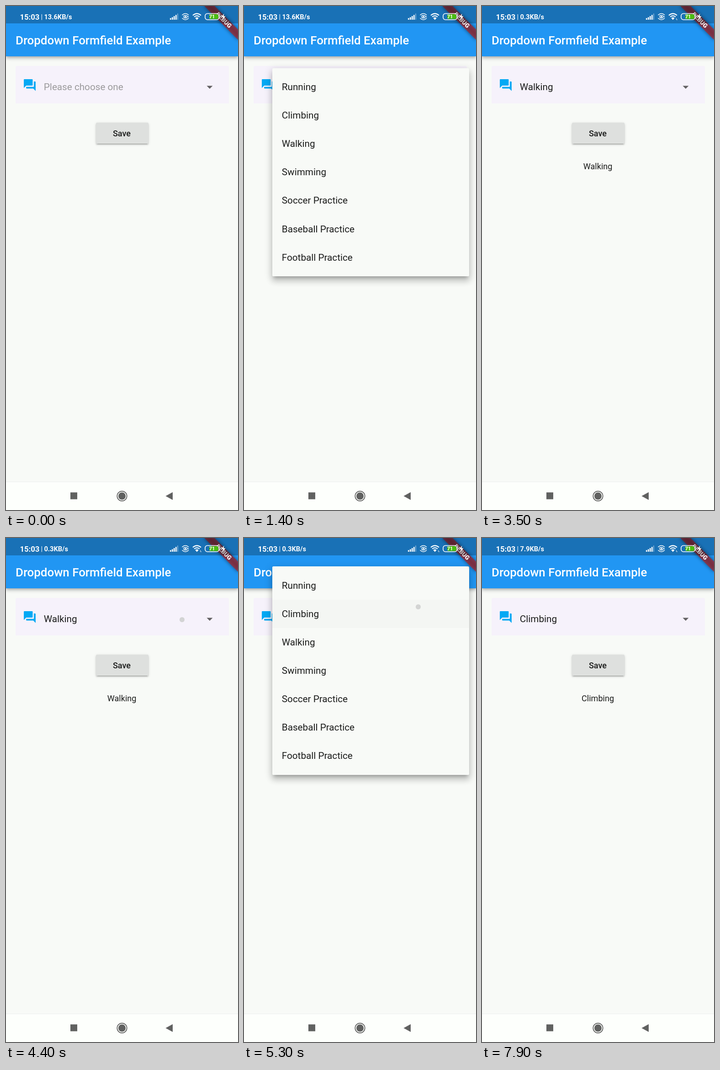
Animation of 508x1102 px, one loop 8 s. Source, as an HTML page:

```html
<!DOCTYPE html>
<html lang="en">
<head>
<meta charset="utf-8">
<title>Dropdown form field</title>
<style>
  html, body { margin: 0; width: 100%; height: 100%; overflow: hidden; }
  body { position: relative; background: #f8faf7; font-family: Roboto, sans-serif; }
  div, svg { position: absolute; }
  svg { left: 0; top: 0; }
  .bar {
    left: 0; top: 0; width: 508px; height: 110px; background: #2196f3;
    box-shadow: 0 2.6px 5.2px -1.3px #0003, 0 5.2px 6.5px #00000024, 0 1.3px 13px #0000001f;
  }
  .field { left: 21px; top: 131px; width: 467px; height: 82px; background: #f6f2fb; border-radius: 3px 3px 0 0; }
  .save {
    left: 197px; top: 254.5px; width: 114.5px; height: 46.5px; border-radius: 2.6px; background: #dee0de;
    box-shadow: 0 3.9px 1.3px -2.6px #0003, 0 2.6px 2.6px #00000024, 0 1.3px 6.5px #0000001f;
  }
  .press { inset: 0; border-radius: inherit; background: #d6d4d3; }
  .menu {
    left: 62px; width: 430.5px; overflow: hidden; border-radius: 2.6px; background: #f8faf7;
    box-shadow: 0 6.5px 6.5px -3.9px #0003, 0 10.4px 13px 1.3px #00000024, 0 3.9px 18px 2.6px #0000001f;
  }
  .row { left: 0; width: 430.5px; height: 62.1px; line-height: 62.1px; text-indent: 20.8px; font-size: 20.7px; color: #1b1c1b; }
  .corner { right: 0; top: 0; width: 120px; height: 120px; overflow: hidden; }
  .ribbon {
    left: 68.25px; top: 36.2px; width: 103.5px; height: 15.5px; transform-origin: 51.75px -36.2px; transform: rotate(45deg);
  }
  .ribbon div { inset: 0; }
  .shade { background: #0000007f; filter: blur(4.5px); }
  .debug { background: #b71c1ca0; color: #fff; font: 900 13.2px/15.5px Roboto, sans-serif; text-align: center; }
  .scrim { left: 0; top: 0; width: 508px; height: 38px; background: #00000040; }
  .nav { left: 0; top: 1041px; width: 508px; height: 61px; background: #fdfffc; box-shadow: 0 -1px #eef0ee; }
  .dot { width: 11px; height: 11px; margin: -5.5px; border-radius: 50%; background: #cacccacc; }
</style>
</head>
<body>
<div class="bar"></div>
<div class="field"></div>
<div class="save"><div class="press" id="press"></div></div>

<svg width="508" height="1102" fill="#1b1c1b">
  <text x="21" y="83.5" font-size="25.87" font-weight="500" fill="#fff">Dropdown Formfield Example</text>
  <path transform="translate(36.4 157.3) scale(1.2936)" fill="#03a9f4"
    d="M21 6h-2v9H6v2c0 .55.45 1 1 1h11l4 4V7c0-.55-.45-1-1-1zm-4 6V3c0-.55-.45-1-1-1H3c-.55 0-1 .45-1 1v14l4-4h10c.55 0 1-.45 1-1z"/>
  <path fill="#626062" d="M439.5 174.5h13l-6.5 6.5z"/>
  <text id="value" x="82.8" y="184.2" font-size="20.7"></text>
  <text x="253.5" y="284.5" font-size="18.1" font-weight="500" text-anchor="middle">Save</text>
  <text id="result" x="253.6" y="357" font-size="18.1" text-anchor="middle"></text>
</svg>

<div class="menu" id="menu"></div>
<div class="corner"><div class="ribbon"><div class="shade"></div><div class="debug">DEBUG</div></div></div>
<div class="scrim"></div>
<div class="nav"></div>

<svg width="508" height="1102" fill="#fff">
  <g font-weight="700">
    <text x="30.5" y="29.5" font-size="16.6">15:03</text>
    <text x="76.5" y="29" font-size="14.6" font-weight="400">|</text>
    <text id="speed" x="83.5" y="29" font-size="14.6"></text>
  </g>
  <path d="M359 26.5h2.6v3.5h-2.6zM363 24.5h2.6v5.5h-2.6zM367 22h2.6v8h-2.6zM371 19.5h2.6v10.5h-2.6z"/>
  <path opacity=".4" d="M375 16.5h2v13.5h-2z"/>
  <g fill="none" stroke="#fff" stroke-width="1.6" stroke-linecap="round">
    <path d="M386 19.5q6.8-6 13.6 0M388.5 22.3q4.3-3.6 8.6 0M386 27q6.8 6 13.6 0M389 24.8q3.8 3.4 7.6 0M398 22.5l1.5 1.5"/>
    <path stroke-width="2.1" stroke-linecap="butt" d="M409 20.5q9-7.6 18 0M412 23.8q6-5 12 0"/>
  </g>
  <circle cx="392.8" cy="23.4" r="1.7"/>
  <path d="M414.3 26.2q3.7-2.8 7.4 0L418 30.5z"/>
  <path id="arrows" d="M424.4 29l1.2-2.5 1.2 2.5zM425.6 29.2h2.4l-1.2 2.4z" opacity=".8"/>
  <rect x="445" y="18" width="20" height="10.5" rx="3.5" fill="#4bbd10"/>
  <rect x="436" y="16.5" width="30.5" height="13.5" rx="5" fill="none" stroke="#fff" stroke-width="1.6"/>
  <text x="451" y="27.3" font-size="11" font-weight="700" text-anchor="middle">71</text>
  <path d="M477.5 16.5l-6 8h4l-1.5 6 6.5-8.2h-4z"/>
  <g fill="#606160">
    <path d="M141 1063.5h15v15h-15zM349.5 1071.5l15.5-8.5v17z"/>
    <circle cx="254" cy="1071.5" r="8"/>
    <circle cx="254" cy="1071.5" r="10.7" fill="none" stroke="#606160" stroke-width="1.7"/>
  </g>
</svg>
<div class="dot" id="dot"></div>

<script>
const LOOP = 8000, TICK = 100, ROW = 62.1, PAD = 10.35;
const ITEMS = ['Running', 'Climbing', 'Walking', 'Swimming', 'Soccer Practice', 'Baseball Practice', 'Football Practice'];
const FULL = ITEMS.length * ROW + 2 * PAD;

// Each list holds [start time, value] steps.
const VALUES = [[0, 'Please choose one'], [2250, 'Walking'], [5450, 'Climbing']];
const RESULTS = [[0, ''], [3100, 'Walking'], [6150, 'Climbing']];
const SPEEDS = [[0, '13.6KB/s'], [2400, '0.3KB/s'], [5800, '7.9KB/s']];
const SAVES = [3000, 6050];
const MENUS = [
  { open: 1050, close: 2250, top: 135.7, from: 0, pick: 2 },
  { open: 4550, close: 5450, top: 62.3, from: 2, pick: 1 }
];
const TAPS = [
  { at: 900, x: 390, y: 178 }, { at: 2100, x: 370, y: 297 }, { at: 3000, x: 275, y: 280 },
  { at: 4400, x: 385, y: 178 }, { at: 5250, x: 381, y: 150 }, { at: 6000, x: 275, y: 280 }
];

const $ = id => document.getElementById(id);
const clamp = v => Math.min(1, Math.max(0, v));
const ramp = (v, a, b) => clamp((v - a) / (b - a));
const mix = (a, b, k) => a + (b - a) * k;
const stepAt = (steps, t) => steps.filter(s => s[0] <= t).pop()[1];

const rows = ITEMS.map(label => {
  const row = document.createElement('div');
  row.className = 'row';
  row.textContent = label;
  $('menu').append(row);
  return row;
});

function drawMenu(t) {
  const m = MENUS.find(m => t >= m.open && t < m.close + 75);
  $('menu').style.display = m ? '' : 'none';
  if (!m) return;
  const p = (t - m.open) / 300;
  const grow = ramp(p, .25, .5);
  const offset = mix(PAD + m.from * ROW, 0, grow);
  Object.assign($('menu').style, {
    top: m.top + offset + 'px',
    height: mix(ROW, FULL, grow) + 'px',
    opacity: ramp(p, 0, .25) * (1 - ramp(t, m.close, m.close + 75))
  });
  const unit = .5 / (ITEMS.length + 1.5);
  rows.forEach((row, i) => {
    const start = .5 + (i + 1) * unit;
    const ink = i === m.pick ? .05 * ramp(t, m.close - 220, m.close) : 0;
    row.style.top = PAD + i * ROW - offset + 'px';
    row.style.opacity = i === m.from ? 1 : ramp(p, start, Math.min(1, start + 1.5 * unit));
    row.style.background = `rgba(0,0,0,${ink})`;
  });
}

function draw(now) {
  const t = Math.floor(now % LOOP / TICK) * TICK;
  $('value').textContent = stepAt(VALUES, t);
  $('value').style.fill = t < VALUES[1][0] ? '#9b9a9c' : '#1b1c1b';
  $('result').textContent = stepAt(RESULTS, t);
  $('speed').textContent = stepAt(SPEEDS, t);
  $('arrows').style.display = t < SPEEDS[1][0] ? 'none' : '';
  $('press').style.opacity = Math.max(...SAVES.map(s => ramp(t, s - 50, s + 50) * (1 - ramp(t, s + 200, s + 400))));
  drawMenu(t);
  const tap = TAPS.find(p => t >= p.at && t < p.at + 100);
  $('dot').style.display = tap ? '' : 'none';
  if (tap) Object.assign($('dot').style, { left: tap.x + 'px', top: tap.y + 'px' });
}

const begin = performance.now();
function loop() {
  draw(performance.now() - begin);
  requestAnimationFrame(loop);
}
loop();
</script>
</body>
</html>
```
